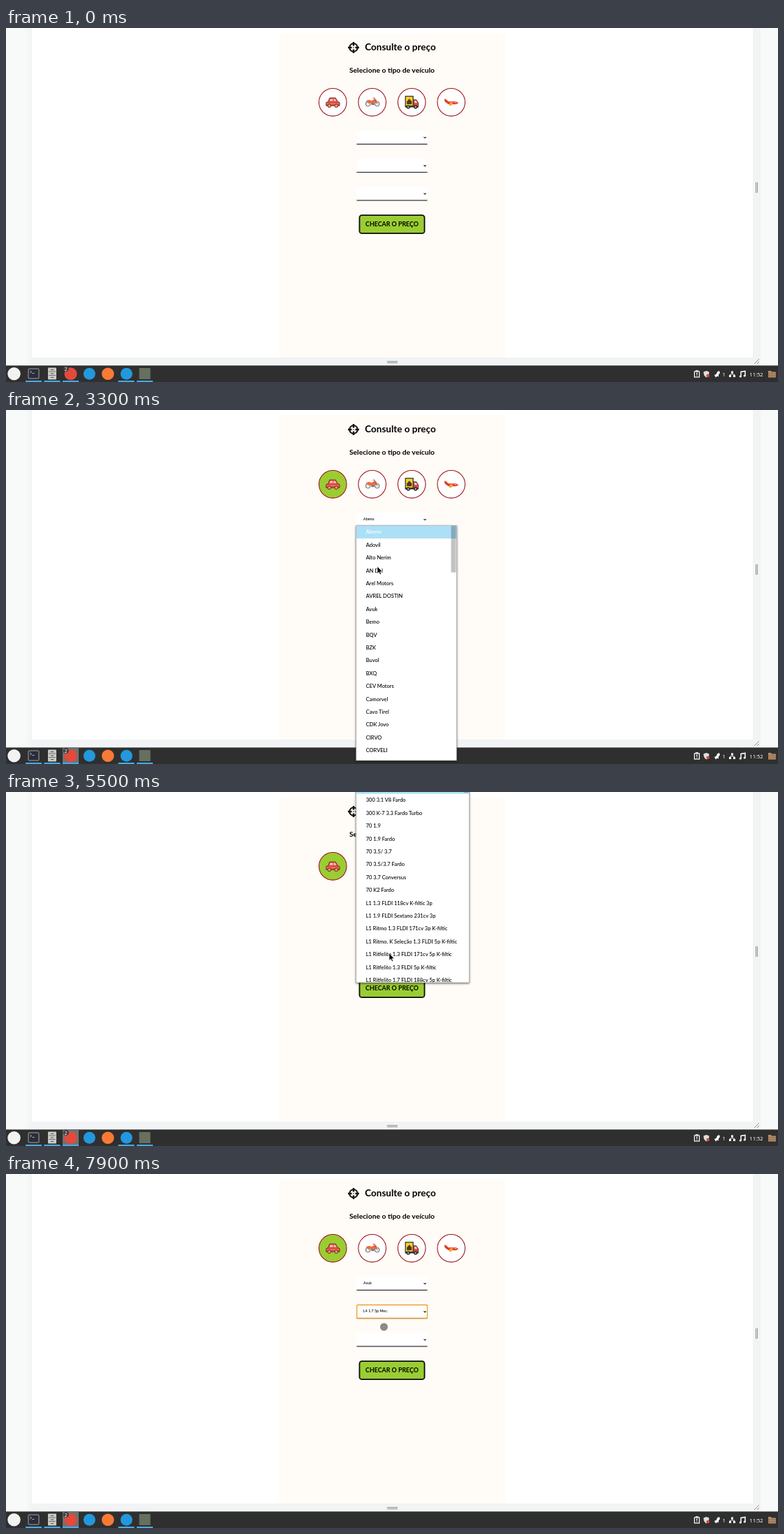
Recreate the animation shown at these times as an HTML page. Size 1104x507 px, loop 8 s.

```html
<!DOCTYPE html>
<html lang="pt-BR">
<head>
<meta charset="utf-8">
<title>Consulte o preço</title>
<style>
  html, body { margin: 0; width: 100%; height: 100%; overflow: hidden; background: #fff; }
  body > svg { display: block; width: 100vw; height: 100vh; }
  text { font-family: Lato, "Open Sans", sans-serif; white-space: pre; }
  .bold { font-weight: 700; text-anchor: middle; }
  .row { font-size: 7.5px; font-weight: 500; }
  .value { font-size: 5.35px; font-weight: 500; }
  .tray text { font: 7.6px "Noto Sans", sans-serif; fill: #fff; }
  .shadow { filter: drop-shadow(.5px 1.5px 1.5px #0009); }
  .disc { fill: #fff; stroke: #a0141a; stroke-width: 1.1; }
</style>
</head>
<body>
<svg id="stage" viewBox="0 0 1104 507" preserveAspectRatio="none">
  <defs>
    <linearGradient id="edge"><stop stop-color="#f8faf9"/><stop offset="1" stop-color="#f2f4f4"/></linearGradient>
  </defs>

  <!-- Page and resize frame -->
  <rect width="1104" height="484" fill="#f8faf9"/>
  <rect x="27" width="10" height="484" fill="url(#edge)"/>
  <rect x="37" width="1042" height="484" fill="#f1f3f4"/>
  <rect x="37" width="1031" height="472" fill="#fff"/>
  <rect x="391" y="8" width="323" height="464" fill="#fffcf7"/>
  <path d="M1072.5 221v15M1074.5 221v15M545 477.500h15M545 479.500h15M1070 481l7-7M1074 481l3-3" stroke="#8b8e91" fill="none"/>

  <!-- Heading -->
  <g stroke="#111" fill="none">
    <circle cx="497" cy="28" r="5.8" stroke-width="2"/>
    <path d="M497 20v5.5M497 30.500v5.5M489 28h5.5M499.500 28h5.5" stroke-width="2.4"/>
    <circle cx="497" cy="28" r=".8" fill="#111" stroke="none"/>
  </g>
  <text class="bold" x="564" y="32.300" font-size="13.5">Consulte o preço</text>
  <text class="bold" x="552" y="64.200" font-size="10.3">Selecione o tipo de veículo</text>

  <!-- Vehicle types -->
  <g id="car" transform="translate(467.300 106.300)">
    <circle id="carDisc" class="disc" r="19.8"/>
    <path d="M-9.500 5V0.500l3-1.500 2-5.200h8.500l3 5.200 2.800 1.500V5z" fill="#dc4b45" stroke="#7d2326" stroke-width=".9"/>
    <path d="M-4.800-1.500l1.300-3.300H0v3.300zM1.200-4.800h2.300l1.800 3.300H1.200z" fill="#f6c7ae"/>
    <path d="M-9 2H9" stroke="#f18a72"/>
    <g fill="#d8a35c" stroke="#7d2326"><circle cx="-5" cy="5" r="2.400"/><circle cx="5" cy="5" r="2.400"/></g>
  </g>
  <g transform="translate(523.700 106.300)">
    <circle class="disc" r="19.8"/>
    <g fill="#eee" stroke="#817b79" stroke-width="1.2"><circle cx="-6" cy="2.500" r="3.200"/><circle cx="7" cy="2.500" r="3.200"/></g>
    <path d="M-9-2l5-1.500 3 1.500 4-2.500 4 1.500-3 4h-7l-2 1z" fill="#ef6a3d"/>
    <path d="M-2 1h5v3h-4z" fill="#74706f"/>
    <path d="M7 2.500L3.500-6H1" stroke="#c0492d" fill="none"/>
  </g>
  <g transform="translate(580.200 106.300)">
    <circle class="disc" r="19.8"/>
    <rect x="-9" y="-8.500" width="11" height="14" fill="#f5cf35" stroke="#33291c" stroke-width="1.2"/>
    <path d="M-7-1l3.500-4L0-1v4h-7z" fill="#4c3a22"/>
    <path d="M2.500-3.500h4L9.500 1v5.500h-7z" fill="#e2453c" stroke="#33291c" stroke-width=".8"/>
    <path d="M4-2h2.200L8 1H4z" fill="#cfe6ee"/>
    <path d="M-9.500 5.500h19v1.800h-19z" fill="#33291c"/>
    <g fill="#aaa" stroke="#222" stroke-width="1.3"><circle cx="-5" cy="6.800" r="2"/><circle cx="5.500" cy="6.800" r="2"/></g>
  </g>
  <g transform="translate(636.700 106.300)">
    <circle class="disc" r="19.8"/>
    <path d="M-10-4.500h2L-4-1H7l3.500 2L7 3H-4L-9-.500z" fill="#e43b2c"/>
    <path d="M-2 0h5l-3 5h-3z" fill="#f4a62a"/>
    <path d="M5 .300h2.500" stroke="#ffd9a0"/>
  </g>

  <g id="fields"></g>

  <rect x="505.500" y="268.200" width="93" height="26" rx="3.500" fill="#9acd32" stroke="#0b0b0b" stroke-width="1.8"/>
  <text class="bold" x="552" y="283.600" font-size="8.9">CHECAR O PREÇO</text>

  <!-- Taskbar -->
  <rect y="483.400" width="1104" height="24" fill="#2f2f2f"/>
  <rect id="activeApp" x="81" y="483.400" width="23" height="24" fill="#717171"/>
  <circle cx="11.500" cy="495.300" r="9.200" fill="#f2f2f2"/>
  <rect x="32" y="488" width="15" height="14" rx="1" fill="#2b2c3b" stroke="#a5a5a5"/>
  <path d="M34.500 491l2 1.500-2 1.500M37.500 494.500h3" stroke="#ddd" fill="none" stroke-width=".8"/>
  <rect x="60" y="486.500" width="12" height="17" rx="1" fill="#c9cac6"/>
  <path d="M61 492h10M61 497.500h10" stroke="#777"/>
  <path d="M64 489.500h4M64 495h4M64 500.500h4" stroke="#555"/>
  <circle cx="92.500" cy="495.300" r="9" fill="#e4493c"/>
  <circle cx="119.300" cy="495.300" r="8.500" fill="#2398dc"/>
  <circle cx="145.700" cy="495.300" r="8.800" fill="#f97a34"/>
  <circle cx="172.300" cy="495.300" r="8.500" fill="#2398dc"/>
  <rect x="190.500" y="487" width="16" height="16" fill="#66705f"/>
  <path d="M28 506h23M54.500 506h23M81 506h23M160.500 506h23M187 506h23" stroke="#4aa9e4" stroke-width="1.8"/>
  <g class="tray">
    <circle cx="85.800" cy="488" r="4" fill="#404040"/>
    <text x="83.800" y="490.500" style="font-size:6.5px">2</text>
    <rect x="984.500" y="492" width="7" height="8" fill="none" stroke="#fff" stroke-width="1.2"/>
    <path d="M986 491h4M988 493.500v3M988 497.500v1" stroke="#fff" stroke-width="1.300"/>
    <path d="M1001.500 491l4 1.500c0 4-1 6-4 8-3-2-4-4-4-8z" fill="#ddd"/>
    <circle cx="1003.800" cy="498" r="2.300" fill="#d9483b"/>
    <path d="M1013 497l3-1.500 1-3 3-1.500 1 3-2 2.500v3l-2-1-2 2z" fill="#fff"/>
    <text x="1024.500" y="498.500">1</text>
    <path d="M1037 491.500h3v3h-3zM1034 497h3v3h-3zM1040 497h3v3h-3z" fill="#fff"/>
    <path d="M1038.500 494v2h-3v2M1038.500 496h3v2" stroke="#fff" fill="none" stroke-width=".8"/>
    <path d="M1051 499v-6.500l6-1v6.500" stroke="#fff" fill="none" stroke-width="1.500"/>
    <circle cx="1050.300" cy="499" r="1.600" fill="#fff"/><circle cx="1056.300" cy="498" r="1.600" fill="#fff"/>
    <text x="1063.300" y="498.500">11:52</text>
    <path d="M1090 491h4l1 1.500h6v8h-11z" fill="#b48c68"/>
    <path d="M1090 495h11M1090 498h11" stroke="#8b684a"/>
  </g>

  <g id="popups"></g>
  <path id="arrow" d="M0 0V10.300L2.400 8.200 4 11.700 5.600 11 4.100 7.600H7.200Z" fill="#0a0a0a" stroke="#fff" stroke-width=".6"/>
  <circle id="press" r="5.500" fill="#444" opacity=".62"/>
</svg>
<script>
const $ = id => document.getElementById(id);
const ROW = 18.4, NOTCH = 54.87, LOOP = 8000;

const brands = ['Abeno', 'Adovil', 'Alto Nerim', 'AN Dol', 'Arel Motors', 'AVREL DOSTIN', 'Avuk',
  'Bemo', 'BQV', 'BZK', 'Buvol', 'BXQ', 'CEV Motors', 'Camorvel', 'Cavo Tirel', 'CDK Jovo', 'CIRVO', 'CORVELI'];
const models = ['300 3.1 V8', '300 3.1 V8 Fardo', '300 K-7 3.3 Fardo Turbo', '70 1.9', '70 1.9 Fardo',
  '70 3.5/ 3.7', '70 3.5/3.7 Fardo', '70 3.7 Conversus', '70 K2 Fardo', 'L1 1.3 FLDI 118cv K-filtic 3p',
  'L1 1.9 FLDI Sextano 231cv 3p', 'L1 Ritmo 1.3 FLDI 171cv 3p K-filtic',
  'L1 Ritmo. K Seleção 1.3 FLDI 5p K-filtic', 'L1 Ritfelito 1.3 FLDI 171cv 5p K-filtic',
  'L1 Ritfelito 1.3 FLDI 5p K-filtic', 'L1 Ritfelito 1.7 FLDI 188cv 5p K-filtic',
  'L4 1.5 3p', 'L4 1.5 3p Aut.', 'L4 1.5 5p', 'L4 1.5 5p Aut.', 'L4 1.5 8V 114cv 3p',
  'L4 1.7 3p', 'L4 1.7 3p Aut.', 'L4 1.7 5p Aut.', 'L4 1.7 5p Mec.',
  'L4 1.7 5p Turbo', 'L4 1.7 Turbo 3p', 'L4 1.7 Turbo 5p'];

// Pointer path: time, x, y
const path = [[300, 352, 64], [900, 486, 112], [1100, 464, 114], [1300, 462, 115], [1500, 462, 115],
  [1600, 468, 118], [2100, 541, 160], [2400, 527, 156], [2500, 527, 156], [2600, 514, 155], [2700, 514, 155],
  [3300, 531, 224], [3600, 538, 296], [3800, 524, 300], [3900, 524, 300], [4000, 524, 291], [4200, 524.5, 291.5],
  [4300, 524.5, 291.5], [5200, 530, 204], [5300, 530, 204], [5500, 548, 231], [6500, 553.5, 183],
  [7100, 546, 215], [7300, 540.5, 217], [7700, 540.5, 217], [7800, 540.5, 219]];
const presses = [[1300, 1600], [2600, 2800], [4200, 4400], [5200, 5400], [7800, 8000]];
const wheelTurns = [5600, 5900, 6200, 6650];

const within = (t, [from, to]) => t >= from && t < to;
const show = (node, on) => node.setAttribute('visibility', on ? 'visible' : 'hidden');
const clamp = x => Math.min(1, Math.max(0, x));

function pointerAt(t) {
  const i = path.findIndex(p => p[0] > t);
  if (i < 0) return path.at(-1).slice(1);
  if (i === 0) return path[0].slice(1);
  const [a, b] = [path[i - 1], path[i]], k = (t - a[0]) / (b[0] - a[0]);
  return [1, 2].map(n => a[n] + (b[n] - a[n]) * k);
}

const scrollAt = t => NOTCH * wheelTurns.reduce((sum, start) => {
  const k = clamp((t - start) / 250);
  return sum + k * k * (3 - 2 * k);
}, 0);

const fieldMarkup = y => `<g>
  <rect x="501.500" y="${y - 9.5}" width="101" height="19.500" fill="#fff"/>
  <path d="M501.500 ${y + 9.8}h101" stroke="#33333b" stroke-width="1.3"/>
  <rect class="focus" x="501.700" y="${y - 9.3}" width="100.800" height="19" rx="1" fill="none" stroke="#e9a132" stroke-width="1.3"/>
  <path d="M597.500 ${y - .4}l1.600 1.500 1.600-1.500" fill="none" stroke="#111" stroke-width="1.100"/>
  <text class="value" x="511" y="${y + 1.6}"></text></g>`;

const popupMarkup = (names, top, width, bottom, thumb) => `<g>
  <rect class="shadow" x="500.800" y="${top}" width="${width}" height="${bottom - top}" fill="#fff" stroke="#a4a4a4" stroke-width=".6"/>
  <svg x="501" y="${top}" width="${width - .5}" height="${bottom - top - .5}"><g class="list">
    <rect width="${width}" height="${ROW}" fill="#ace0f6"/>
    ${names.map((name, i) => `<text class="row" x="13.700" y="${(i + .5) * ROW + 2.6}" fill="${i ? '#000' : '#fff'}">${name}</text>`).join('')}
  </g><rect class="thumb" x="${width - 8}" width="7" height="${thumb}" fill="#000" opacity=".24"/></svg></g>`;

$('fields').innerHTML = [156.5, 196.8, 237].map(fieldMarkup).join('');
$('popups').innerHTML = popupMarkup(brands, 165.6, 143.5, 502, 67) + popupMarkup(models, -15.8, 161.5, 273, 17);
const fields = [...$('fields').children], [brandPopup, modelPopup] = $('popups').children;

function render(t) {
  const brand = t < 1600 ? '' : t < 4400 ? brands[0] : brands[6];
  const model = t < 4800 ? '' : t < 7900 ? models[0] : models[24];
  const focused = t < 4400 ? -1 : t < 5400 ? 0 : 1;
  fields.forEach((field, i) => {
    field.querySelector('text').textContent = [brand, model, ''][i];
    show(field.querySelector('.focus'), i === focused);
  });

  $('carDisc').style.fill = t < 1300 ? '#fff' : '#9acd32';
  $('car').setAttribute('opacity', within(t, [1300, 2800]) ? .6 : 1);
  show($('activeApp'), t >= 1400);

  show(brandPopup, within(t, [2800, 4400]));
  show(modelPopup, within(t, [5400, 7900]));
  const scroll = scrollAt(t);
  modelPopup.querySelector('.list').setAttribute('transform', `translate(0 ${-scroll})`);
  modelPopup.querySelector('.thumb').setAttribute('y', scroll * .061);

  const pressed = presses.some(span => within(t, span));
  const place = `translate(${pointerAt(t)})`;
  $('arrow').setAttribute('transform', place);
  $('press').setAttribute('transform', place);
  show($('arrow'), t >= 300 && !pressed);
  show($('press'), pressed);
}

function tick() {
  render(Math.floor(performance.now() % LOOP / 100) * 100);
  requestAnimationFrame(tick);
}
tick();
</script>
</body>
</html>
```
